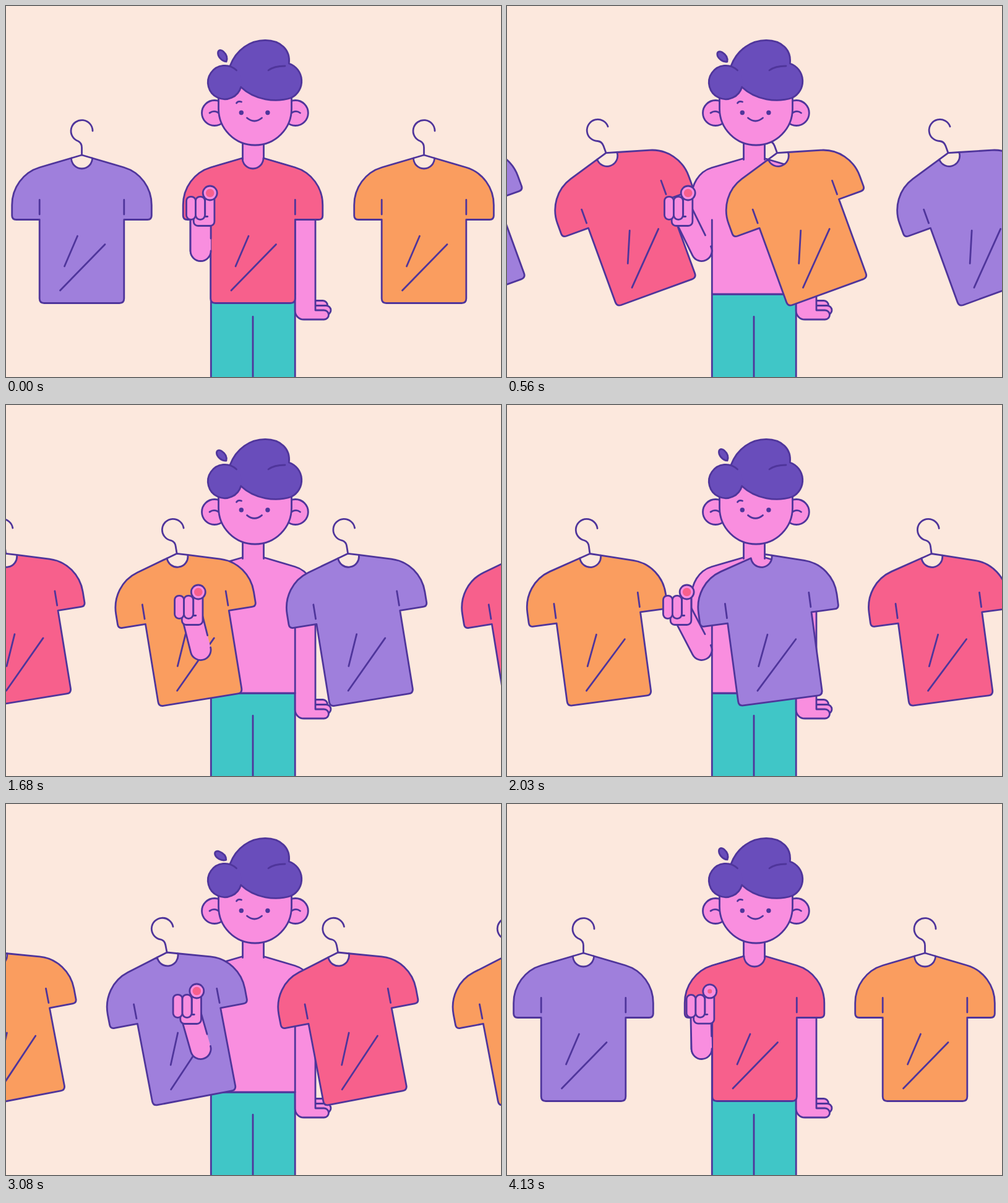
Write an HTML page that moves like this. It is 800x600 px and loops after 4.2 s.

```html
<!DOCTYPE html>
<html lang="en">
<head>
<meta charset="utf-8">
<title>Choosing a shirt</title>
<style>
  html, body { margin: 0; width: 100%; height: 100%; overflow: hidden; background: #fce8dd; }
  svg { display: block; width: 800px; height: 600px; stroke: #4f359b; stroke-width: 2.8; stroke-linecap: round; stroke-linejoin: round; }
  .skin { fill: #f98edf; }
  .hair { fill: #694dbb; }
  .line { fill: none; }
  .bare { stroke: none; }
  .ink { fill: #4f359b; stroke: none; }
</style>
</head>
<body>
<svg viewBox="0 0 800 600">
  <defs>
    <g id="hook" class="line">
      <path d="M0 241V229C0 222-3 220-6 218.5A17.5 17.5 0 1 1 17.5 202"/>
      <path d="M-17 246L0 241L17 246"/>
    </g>
    <g id="shirt">
      <path d="M-17 246A17 17 0 0 0 17 246L68 261C95 269 112.8 294 112.8 322V339Q112.8 345.5 106 345.5H68.3V473Q68.3 480.5 60.8 480.5H-60.8Q-68.3 480.5-68.3 473V345.5H-106Q-112.8 345.5-112.8 339V322C-112.8 294-95 269-68 261Z"/>
      <path class="line" d="M-68.3 313.5V337M68.3 313.5V337M-7 372L-28 421M37.5 385.5L-35 460"/>
    </g>
  </defs>

  <g id="hooks"></g>

  <g id="body">
    <path fill="#40c6c7" d="M331.3 620V466H467.2V620"/>
    <path d="M399 502.5V620"/>
    <g class="skin">
      <rect x="488" y="476.5" width="31.5" height="15" rx="7.5"/>
      <rect x="488" y="484.5" width="37" height="15" rx="7.5"/>
      <path d="M382.5 246.5L331 261.5C309 268 298 290 298 311V396A16.7 16.7 0 0 0 331.3 396V466H467.2V493A14 14 0 0 0 481.2 507H514A7.5 7.5 0 0 0 514 492H500V311C500 290 489 268 467 261.5L416.5 246.5"/>
      <path class="line" d="M331.3 346V396M467.2 346V466"/>
      <path class="bare" d="M382.5 205H416.5V252H382.5Z"/>
      <path class="line" d="M382.5 210V248.5M416.5 210V248.5"/>
    </g>
  </g>

  <g id="shirts"></g>

  <g class="skin">
    <g id="forearm">
      <path d="M-16.5-75V0A16.5 16.5 0 0 0 16.5 0V-75" class="bare"/>
      <path class="line" d="M-16.5-75V0A16.5 16.5 0 0 0 16.5 0M16.5-20V-75"/>
    </g>
    <g id="hand">
      <path d="M-11 10V18.5A7 7 0 0 0-4 25.5H15.7A7 7 0 0 0 22.7 18.5V-26H7.5V8Z"/>
      <rect x="-22.7" y="-21.7" width="15" height="37" rx="7"/>
      <rect x="-7.7" y="-21.7" width="15" height="37" rx="7"/>
      <path d="M7.5 10.5H11.5"/>
      <circle id="tip" cx="15.5" cy="-27.5"/>
      <circle id="dot" class="bare" cx="15.5" cy="-27.5" fill="#f7608c"/>
    </g>
  </g>

  <g id="head">
    <g class="skin">
      <circle cx="337" cy="173" r="20.5"/>
      <circle cx="467.8" cy="173" r="20.5"/>
      <path class="line" d="M329 173Q336 168 343 172.5M462 172.5Q469 168 475.5 173"/>
      <path d="M343.5 130V166A59 59 0 0 0 461.5 166V130"/>
    </g>
    <path class="line" d="M372.5 157Q375 153 380.5 155"/>
    <g id="face">
      <circle class="ink" cx="380.3" cy="172.5" r="3.7"/>
      <circle class="ink" cx="422.9" cy="172.5" r="3.7"/>
      <path class="line" d="M389.5 181Q401.5 191 413.5 181"/>
    </g>
    <g class="hair">
      <path d="M362 97C372 70 395 55.3 419 55.3C444 55.3 460 71 457.3 93A30.1 30.1 0 0 1 461 148.5C436 156.5 402 152.5 379.5 131"/>
      <circle class="bare" cx="353.5" cy="123.5" r="27.2"/>
      <path class="line" d="M379.7 131A27.2 27.2 0 1 1 372.5 104M424 104C432 98 441 97 451 97"/>
      <path id="leaf" d="M356 90C348 90 341 82 341.5 76C342 71.5 346.5 71 350 74C355 78 358 84 356 90Z"/>
    </g>
  </g>
</svg>
<script>
const LOOP = 4200, SWAP = 1400, STEP = 75;
const COLORS = ['#f7608c', '#fa9d5f', '#9f7fdc'];
const FROM = [122.5, 399, 675.5, 966];
const TO = [-152.5, 123.5, 400, 675.5];
const $ = id => document.getElementById(id);

function addUses(parent, ref) {
  return FROM.map(() => {
    const use = document.createElementNS('http://www.w3.org/2000/svg', 'use');
    use.setAttribute('href', ref);
    return $(parent).appendChild(use);
  });
}
const hooks = addUses('hooks', '#hook');
const shirts = addUses('shirts', '#shirt');

const mix = (a, b, k) => a + (b - a) * k;
const span = (t, a, b) => Math.min(1, Math.max(0, (t - a) / (b - a)));
const smooth = (t, a, b) => { const u = span(t, a, b); return u * u * (3 - 2 * u); };

// cubic-bezier(.27, 0, .38, 1)
function glide(u) {
  let lo = 0, hi = 1;
  for (let i = 0; i < 24; i++) {
    const s = (lo + hi) / 2, r = 1 - s;
    if (3 * s * r * (.27 * r + .38 * s) + s ** 3 < u) lo = s; else hi = s;
  }
  return lo * lo * (3 - 2 * lo);
}

// Lag behind the pull, swing past, settle
const sway = t => -20.3 * smooth(t, 20, 510) + 25.3 * smooth(t, 510, 740) - 5 * smooth(t, 740, 940);

function draw(time) {
  const turn = Math.floor(time / SWAP);
  const t = time - turn * SWAP;
  const move = glide(span(t, 0, 700));

  FROM.forEach((from, i) => {
    const place = `translate(${mix(from, TO[i], move)} 0) rotate(${sway(t)} 0 184.5)`;
    hooks[i].setAttribute('transform', place);
    shirts[i].setAttribute('transform', place);
    shirts[i].setAttribute('fill', COLORS[(turn + i + 2) % 3]);
  });

  const dx = -39.5 * (move - smooth(t, 870, 1390));
  const press = 1 - smooth(t, 700, 1050) + smooth(t, 1050, 1400);
  const touch = 1 - span(t, 700, 860) + span(t, 1240, 1400);
  const angle = Math.atan(dx / 75) * 180 / Math.PI;
  $('forearm').setAttribute('transform', `translate(314.6 396) rotate(${angle})`);
  $('hand').setAttribute('transform', `translate(${314.2 + dx} 330) scale(${mix(.87, 1, press)})`);
  $('tip').setAttribute('r', mix(9, 11.5, press));
  $('dot').setAttribute('r', 6.8 * touch);

  const look = smooth(time, 1400, 1600) - smooth(time, 2800, 3000);
  $('face').setAttribute('transform', `translate(0 ${-2.7 * look})`);
  const tilt = 4 - 11 * (1 - Math.cos(time / 2100 * 2 * Math.PI));
  $('leaf').setAttribute('transform', `rotate(${tilt} 357 91)`);
}

const start = performance.now();
function tick() {
  // Poses hold for one step; the small lead absorbs timer jitter
  const now = (performance.now() - start + 3) % LOOP;
  draw(Math.floor(now / STEP) * STEP);
  requestAnimationFrame(tick);
}
tick();
</script>
</body>
</html>
```
